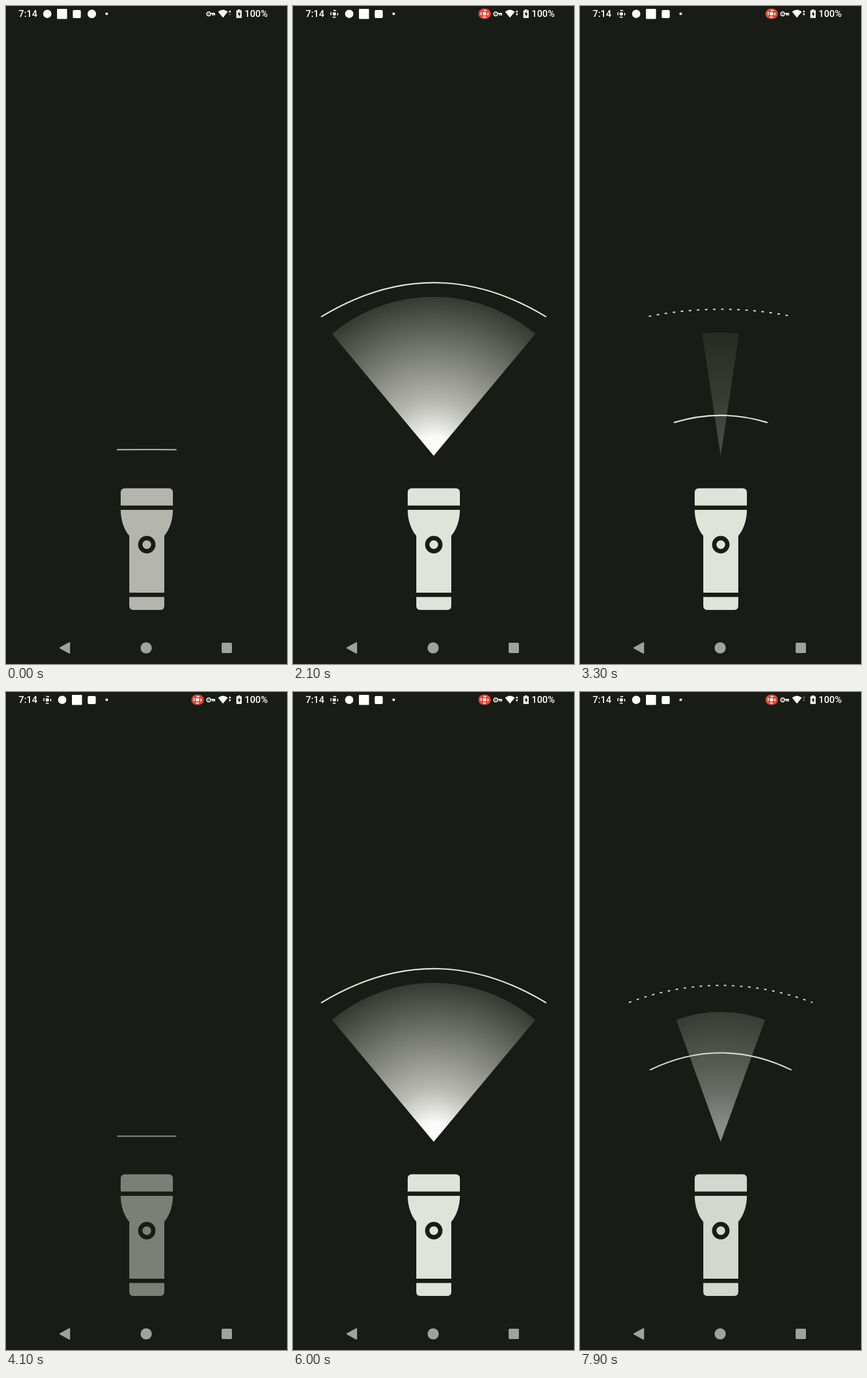
These frames come from a looping animation (490x1144 px, 8000 ms). An HTML page:

```html
<!DOCTYPE html>
<html lang="en">
<head>
<meta charset="utf-8">
<title>Torch</title>
<style>
  html, body { margin: 0; width: 100%; height: 100%; overflow: hidden; background: #191b16; }
  svg { display: block; width: 100%; height: 100%; }
  text { font: 500 16.5px Roboto, "Liberation Sans", sans-serif; fill: #fff; }
</style>
</head>
<body>
<svg viewBox="0 0 490 1144">
  <defs>
    <radialGradient id="glow" gradientUnits="userSpaceOnUse" cx="245.3" cy="782" r="276.5">
      <stop offset="0" stop-color="#fff"/>
      <stop offset=".12" stop-color="#fff" stop-opacity=".98"/>
      <stop offset=".35" stop-color="#e8eae2" stop-opacity=".75"/>
      <stop offset="1" stop-color="#e0e3da" stop-opacity=".15"/>
    </radialGradient>
    <g id="rec" fill="none" stroke="#fff">
      <circle r="3" fill="#fff" stroke="none"/>
      <circle r="6" stroke-width="1.7" stroke-dasharray="5.4 4.02" stroke-dashoffset="2.7"/>
    </g>
  </defs>

  <!-- status bar -->
  <text x="22" y="19.3">7:14</text>
  <text x="416" y="19.3">100%</text>
  <g fill="#fff">
    <g id="apps">
      <circle cx="72" cy="13.7" r="7.2"/>
      <rect x="89" y="5" width="17.5" height="17.5" rx="1"/>
      <rect x="116.5" y="7" width="14" height="14" rx="2"/>
    </g>
    <circle id="extra" cx="149.6" cy="13.7" r="7.4"/>
    <circle cx="175.6" cy="13.5" r="2.3"/>
    <g id="recording">
      <use href="#rec" x="72" y="13.7"/>
      <rect x="323.3" y="4.5" width="21.7" height="18" rx="9" fill="#e24539"/>
      <use href="#rec" x="334" y="13.5"/>
    </g>
    <circle cx="353.5" cy="13.7" r="3.4" fill="none" stroke="#fff" stroke-width="1.8"/>
    <circle cx="353.5" cy="13.7" r="1"/>
    <path d="M356.5 13H363.5V16.5M360.5 13V16.5" fill="none" stroke="#fff" stroke-width="2"/>
    <path d="M369.8 10Q378.3 2.8 386.8 10L378.3 20.3Z"/>
    <path id="up" d="M388.3 11L390.4 7L392.5 11Z"/>
    <path id="down" d="M388.3 13L390.4 17L392.5 13Z"/>
    <path d="M404.3 6H408.3V7.5H411V20.8H401.7V7.5H404.3Z"/>
    <path d="M407.2 9L403.7 14.8H406V19L409.4 13H407.2Z" fill="#191b16"/>
  </g>

  <!-- light -->
  <path id="beam" fill="url(#glow)"/>
  <g fill="none" stroke="#e0e3da" stroke-linecap="round">
    <path id="dots" stroke-width="2.2" stroke-dasharray="2.6 11.5"/>
    <path id="line" stroke-width="2.4"/>
  </g>

  <!-- torch -->
  <g fill="#e0e3da">
    <path class="lit" d="M200 868.5V846Q200 838.5 207.5 838.5H283.5Q291 838.5 291 846V868.5Z"/>
    <path class="lit" d="M200 876H291C291 894 285 911 276 921V1020H215V921C206 911 200 894 200 876Z"/>
    <path class="lit" d="M215 1027.5H276V1043Q276 1050 269 1050H222Q215 1050 215 1043Z"/>
    <circle cx="245.5" cy="936.5" r="15.2" fill="#191b16"/>
    <circle class="lit" cx="245.5" cy="936.5" r="7.6"/>
  </g>

  <!-- navigation -->
  <g fill="#a1a29f" stroke="#a1a29f" stroke-linejoin="round">
    <path d="M94.5 1116L110.5 1107.3V1124.7Z" stroke-width="2.5"/>
    <circle cx="244.4" cy="1116" r="9.8" stroke="none"/>
    <rect x="376" y="1107" width="18" height="18" rx="2" stroke="none"/>
  </g>
</svg>
<script>
const LOOP = 8000, STEP = 100, CX = 245.3, SOURCE_Y = 782;
const $ = id => document.getElementById(id);
const clamp = x => Math.min(1, Math.max(0, x));
const linear = u => u;

// cubic-bezier(.4, 0, .2, 1)
function ease(u) {
  let lo = 0, hi = 1;
  for (let i = 0; i < 24; i++) {
    const s = (lo + hi) / 2, r = 1 - s;
    if (1.2 * s * r * r + .6 * s * s * r + s * s * s < u) lo = s; else hi = s;
  }
  return lo * lo * (3 - 2 * lo);
}

// [time, value, easing towards this key]
const level = [
  [0, .004], [780, 0], [1340, .5], [1750, .5], [2100, 1], [2450, 1],
  [3300, .208, linear], [3430, .143, linear], [3555, .143], [3660, 0],
  [4480, 0], [5040, .143], [5200, .143], [5980, 1], [6130, 1],
  [6500, .675], [6850, .675], [7650, .5], [7895, .5], [8000, .004]
];
const power = [
  [-230, 1], [470, .5], [1032, .5], [1532, 1], [3430, 1], [4130, .5],
  [4824, .5], [5324, 1], [7770, 1], [8470, .5]
];

function sample(keys, t) {
  const i = keys.findIndex(k => k[0] > t);
  const [t0, a] = keys[i - 1], [t1, b, easing = ease] = keys[i];
  return a + (b - a) * easing((t - t0) / (t1 - t0));
}

function arc(half, y, p) {
  return `M${CX - half} ${y}Q${CX} ${y - 118 * p} ${CX + half} ${y}`;
}

function draw(t) {
  const p = sample(level, t), on = sample(power, t);

  const half = 212 * Math.tan((.4 + 39.5 * p) * Math.PI / 180);
  const r = Math.hypot(half, 212);
  $('beam').setAttribute('d',
    `M${CX} ${SOURCE_Y}L${CX - half} 570A${r} ${r} 0 0 1 ${CX + half} 570Z`);
  $('beam').setAttribute('opacity', p);

  $('line').setAttribute('d', arc(50.5 + 145 * p, 772.3 - 232.3 * p, p));
  $('line').setAttribute('opacity', on);
  $('dots').setAttribute('d', arc(99.5 + 120 * p, 539.5, p));
  $('dots').setAttribute('opacity', on * clamp(p * 20 - .2) * clamp((.8 - p) * 10));
  document.querySelectorAll('.lit').forEach(e => e.setAttribute('opacity', on));

  const recording = t >= 100;
  $('recording').setAttribute('visibility', recording ? 'visible' : 'hidden');
  $('extra').setAttribute('visibility', recording ? 'hidden' : 'visible');
  $('apps').setAttribute('transform', `translate(${recording ? 26 : 0} 0)`);
  $('up').setAttribute('opacity', t < 7800 ? 1 : .35);
  $('down').setAttribute('opacity', t >= 1800 && t < 7800 ? 1 : .35);
}

const start = performance.now();
function tick() {
  const t = (performance.now() - start) % LOOP;
  draw(Math.floor(t / STEP) * STEP);
  requestAnimationFrame(tick);
}
tick();
</script>
</body>
</html>
```
